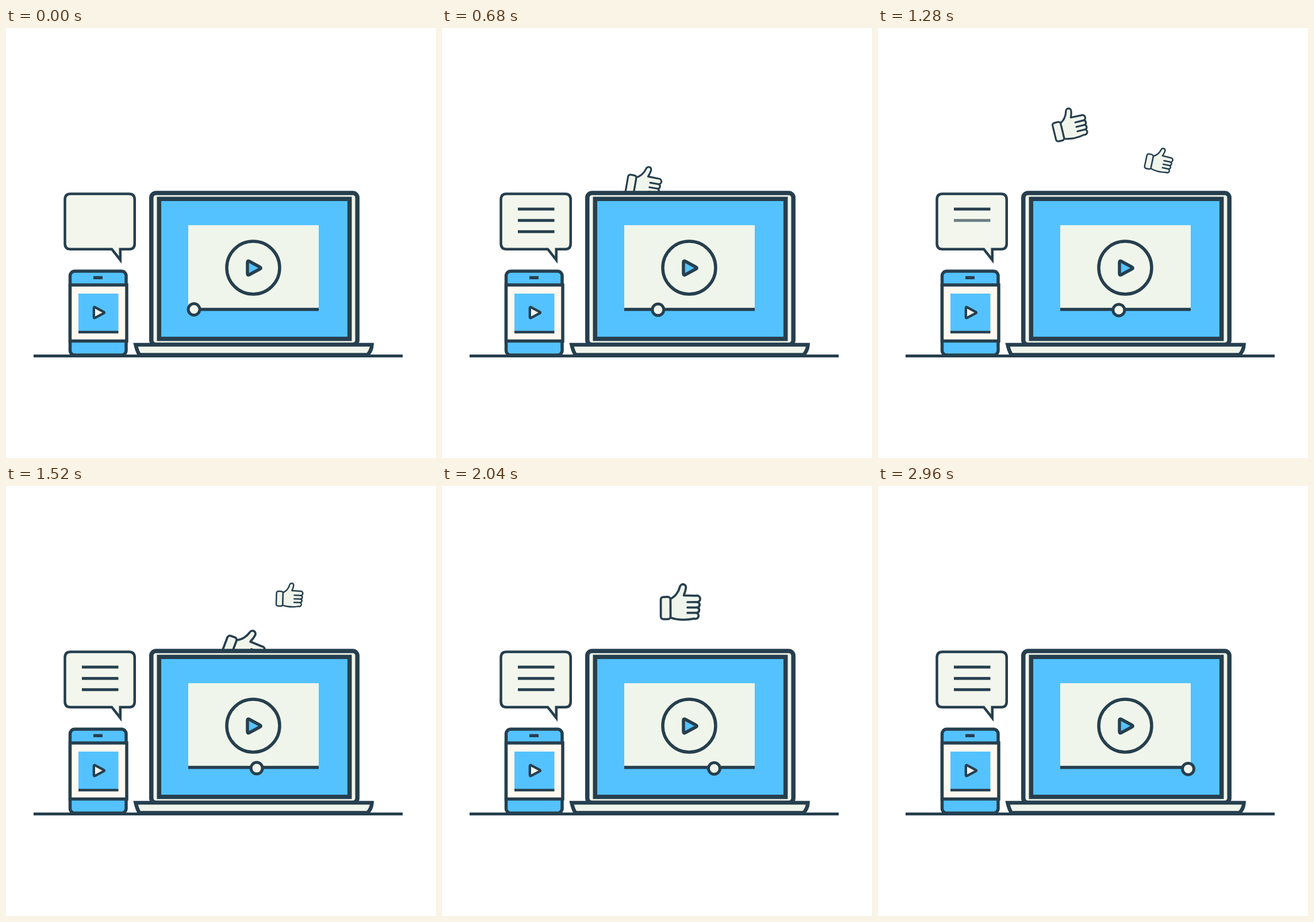
Write an HTML page that moves like this. It is 748 px wide and 748 px high and loops after 3000 ms.

```html
<!DOCTYPE html>
<html lang="en">
<head>
<meta charset="utf-8">
<title>Video likes</title>
<style>
  html, body { margin: 0; height: 100%; overflow: hidden; background: #fff; }
  svg { display: block; width: 100%; height: 100%; }
  .ink { stroke: #263f4e; }
  .dark { fill: #263f4e; }
  .blue { fill: #54c2ff; }
  .cream { fill: #f0f5eb; }
</style>
</head>
<body>
<svg viewBox="0 0 748 748" fill="none">
  <defs>
    <g id="hand" class="ink cream" stroke-width="3.2" stroke-linejoin="round" stroke-linecap="round">
      <path d="M-13.5-7C-6-10-1-18 .5-24C2-31 11.5-29.500 9.500-22C9-18 7.500-15 6.500-12L25-11.500
        A4.800 4.800 0 0 1 27-2A4.100 4.100 0 0 1 26.500 6A4.100 4.100 0 0 1 25.500 14A4.300 4.300 0 0 1 22 22.500
        C10 25-2 25-13.500 21Z"/>
      <path d="M12-2H27M12 6H26.500M12 14H25.500"/>
      <rect x="-27.700" y="-9.800" width="14.400" height="33" rx="4"/>
    </g>
    <path id="play" class="ink" stroke-width="5.5" stroke-linejoin="round"
      d="M-10.500-9.500Q-10.500-13.500-7-11.500L11.500-1.500Q14 0 11.500 1.500L-7 11.500Q-10.500 13.500-10.500 9.500Z"/>
  </defs>

  <g id="thumbs"></g>

  <path class="ink" stroke-width="5" d="M48 570.500H690"/>

  <!-- laptop -->
  <g class="ink">
    <rect class="cream" x="252.800" y="287" width="358.400" height="264" rx="8" stroke-width="7.5"/>
    <rect class="blue" x="266.300" y="297.300" width="331.400" height="243.500" stroke-width="7.5"/>
    <path class="cream" stroke-width="6.5" d="M225.500 551H636.500Q636 561 629 568.500H232Q228 562 225.500 551Z"/>
    <path class="cream" stroke="none" d="M317 343H544V488H317Z"/>
    <circle cx="430" cy="417" r="46" stroke-width="5.5"/>
    <path stroke-width="5.5" d="M317 489.500H544"/>
  </g>
  <use id="bigPlay" class="blue" href="#play"/>
  <circle id="knob" class="ink cream" r="10" stroke-width="5"/>

  <!-- phone -->
  <g class="ink" stroke-width="5.5">
    <rect class="blue" x="111.500" y="423" width="97.500" height="146" rx="8"/>
    <path fill="#fdf8f0" d="M111.500 447H210V544.500H111.500Z"/>
    <path d="M152 434.300H168"/>
    <path class="blue" stroke="none" d="M126 462H195.500V528H126Z"/>
    <path stroke-width="4.5" d="M126 529H195.500"/>
  </g>
  <use id="smallPlay" class="cream" href="#play"/>

  <!-- speech bubble -->
  <path class="ink" fill="#f2f6ec" stroke-width="4.5"
    d="M112 288.500H214Q223.800 288.500 223.800 298.500V375Q223.800 384.700 214.500 384.700H198.800V403.500L184 384.700H112
    Q102.500 384.700 102.500 375V298.500Q102.500 288.500 112 288.500Z"/>
  <g id="lines" class="ink" stroke-width="5">
    <path d="M132 315H195.500"/>
    <path d="M132 334.700H195.500"/>
    <path d="M132 354.200H195.500"/>
  </g>
</svg>
<script>
const LOOP = 3000, STEP = 40, FADE = 150;
const $ = id => document.getElementById(id);
const clamp = v => Math.max(0, Math.min(1, v));

// Position at time `at`, with velocities per ms; shown only from `from` until `to`.
const thumbs = [
  { at: 680, from: 380, to: 1300, x: 350, vx: -.03, y: 269, vy: -.1667, ay: 0, tilt: 10, spin: -.0395, size: 1 },
  { at: 1280, from: 800, to: 1660, x: 488, vx: .017, y: 230.4, vy: -.163, ay: 0, tilt: 12, spin: -.042, size: .78 },
  { at: 1760, from: 1320, to: 2300, x: 413, vx: 0, y: 242, vy: -.15, ay: .000056, tilt: 11, spin: -.04, size: 1.17 }
];
for (const th of thumbs) {
  th.el = document.createElementNS("http://www.w3.org/2000/svg", "use");
  th.el.setAttribute("href", "#hand");
  $("thumbs").append(th.el);
}
const lines = [...$("lines").children];
const lineStarts = [2165, 1032, 0];

const place = (el, x, y, scale = 1, tilt = 0) =>
  el.setAttribute("transform", `translate(${x} ${y}) rotate(${tilt}) scale(${scale})`);

const pulse = (t, from, to, amount) =>
  1 + amount * Math.sin(Math.PI * clamp((t - from) / (to - from))) ** 2;

function draw(t) {
  for (const th of thumbs) {
    const d = t - th.at;
    th.el.style.display = t >= th.from && t < th.to ? "" : "none";
    place(th.el, th.x + th.vx * d, th.y + th.vy * d + th.ay * d * d, th.size, th.tilt + th.spin * d);
  }
  const start = lineStarts.find(s => t >= s);
  lines.forEach((line, i) => line.style.opacity = clamp((t - start) / FADE - i));
  place($("knob"), 327 + t * .0718, 489.5 + t * .0009);
  place($("smallPlay"), 161, 495, .78 * pulse(t, 0, 680, .2));
  place($("bigPlay"), 430.5, 417.5, pulse(t, 2340, 2860, .15));
}

function tick() {
  draw(Math.floor(performance.now() % LOOP / STEP) * STEP);
  requestAnimationFrame(tick);
}
tick();
</script>
</body>
</html>
```
